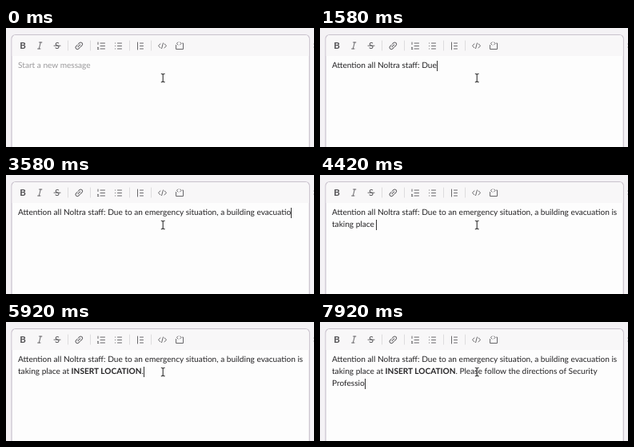
Recreate the animation shown at these times as an HTML page. Size 385 px wide and 149 px high, loop 8 s.

```html
<!DOCTYPE html>
<html lang="en">
<head>
<meta charset="utf-8">
<title>Message composer</title>
<style>
  html, body { margin: 0; width: 100%; height: 100%; overflow: hidden; background: #f4f2f5; }
  #stage { position: relative; width: 385px; height: 149px; overflow: hidden; }
  svg { position: absolute; inset: 0; }
  #message {
    position: absolute; left: 15px; top: 40.4px; width: 357px;
    font: 10.12px/15px Lato, sans-serif; color: #252426;
    white-space: pre-wrap; text-rendering: geometricPrecision;
  }
  #message.empty { color: #9b9a9c; }
  #caret { position: relative; }
  #caret::after {
    content: ""; position: absolute; left: 0; top: 0;
    width: 1px; height: 12.5px; background: #333;
  }
  .empty #caret { display: none; }
  b { font-weight: 700; }
</style>
</head>
<body>
<div id="stage">
  <svg width="385" height="149" fill="none" stroke="#68676a" stroke-linecap="round" stroke-linejoin="round">
    <rect x="7" y="8.5" width="372.3" height="160" rx="5" fill="#fdfdfd" stroke="#c9c2cd" stroke-width="1.2"/>
    <path d="M7.6 35V13.5a4.4 4.4 0 0 1 4.4-4.4h362.300a4.4 4.4 0 0 1 4.4 4.4V35z" fill="#f8f7f8" stroke="none"/>
    <rect id="boldButton" x="11" y="13" width="19" height="18" rx="2.5" fill="#dddcde" stroke="none"/>
    <g fill="#515053" stroke="none" font-family="Lato, sans-serif" text-anchor="middle">
      <text x="21" y="26.2" font-size="11.5" font-weight="700">B</text>
      <text x="64" y="26" font-size="11">S</text>
    </g>
    <path d="M41.5 18h3.4M39.6 26h3.4M43.3 18l-2 8M60 22.2h8"/>
    <path d="M77.5 16v12M105.5 16v12M154.5 16v12M181.5 16v12" stroke="#dddcde"/>
    <g transform="translate(91.3 22.3) rotate(-45)">
      <path d="M-.7-2.2h-2.2a2.2 2.2 0 0 0 0 4.4h2.2M.7-2.2h2.2a2.2 2.2 0 0 1 0 4.4H.7M-2 0h4"/>
    </g>
    <path d="M118 19h5.5M118 22.5h5.5M118 26h5.5M115 18v2.5M114.4 24.4h1.3l-1.3 2.2h1.4"/>
    <path d="M139.5 19h5M139.5 22.5h5M139.5 26h5M136.5 19h.1M136.5 22.5h.1M136.5 26h.1"/>
    <path d="M164.5 18v9M167.5 19h4M167.5 22.5h4M167.5 26h4"/>
    <path d="M193 19.8l-2.6 2.5 2.6 2.5M198 19.8l2.6 2.5-2.6 2.5M196.4 19l-1.8 6.6"/>
    <path d="M215 17.8l-1.6 1.6 1.6 1.6M217.5 17.8l1.6 1.6-1.6 1.6M212.5 21.5v5h9v-7.5h-.8"/>
    <path d="M384.5 20v.1M384.5 24v.1" stroke="#aaa"/>
  </svg>
  <div id="message"><span id="before"></span><b id="strong"></b><span id="after"></span><span id="caret"></span></div>
  <svg width="385" height="149" fill="none">
    <path id="pointer" d="M193.8 57.3q2.4 0 2.4 1.5v7.4q0 1.5-2.4 1.5M198.6 57.3q-2.4 0-2.4 1.5v7.4q0 1.5 2.4 1.5" stroke="#333" stroke-width="1.1"/>
  </svg>
</div>
<script>
  const $ = id => document.getElementById(id);
  const PLACEHOLDER = "Start a new message";
  const INTRO = "Attention all Noltra staff: Due to an emergency situation, " +
    "a building evacuation is taking place at ";
  const LOCATION = "INSERT LOCATION";
  const OUTRO = ". Please follow the directions of Security Professio";
  const STEPS = 96, STEP_MS = 8000 / STEPS;

  // Typing pace: [step, characters typed so far]
  const PACE = [[0, 0], [4, 0], [19, 31], [20, 34], [30, 56], [33, 60], [40, 73], [53, 97], [55, 100],
    [57, 100], [69, 115], [70, 115], [71, 116], [80, 140], [83, 140], [90, 162], [95, 167]];

  function typedAt(step) {
    const i = PACE.findIndex(([s]) => s >= step);
    if (i < 1) return 0;
    const [s0, n0] = PACE[i - 1], [s1, n1] = PACE[i];
    return Math.round(n0 + (n1 - n0) * (step - s0) / (s1 - s0));
  }

  function draw(now) {
    const step = Math.floor((now + 4) / STEP_MS) % STEPS;
    const typed = typedAt(step);
    const part = (text, start) => text.slice(0, Math.max(0, typed - start));
    $("message").className = typed ? "" : "empty";
    $("before").textContent = typed ? part(INTRO, 0) : PLACEHOLDER;
    $("strong").textContent = part(LOCATION, INTRO.length);
    $("after").textContent = part(OUTRO, INTRO.length + LOCATION.length);
    $("boldButton").style.display = step >= 56 && step < 70 ? "" : "none";
  }

  function tick() {
    draw(performance.now());
    requestAnimationFrame(tick);
  }
  tick();
</script>
</body>
</html>
```
